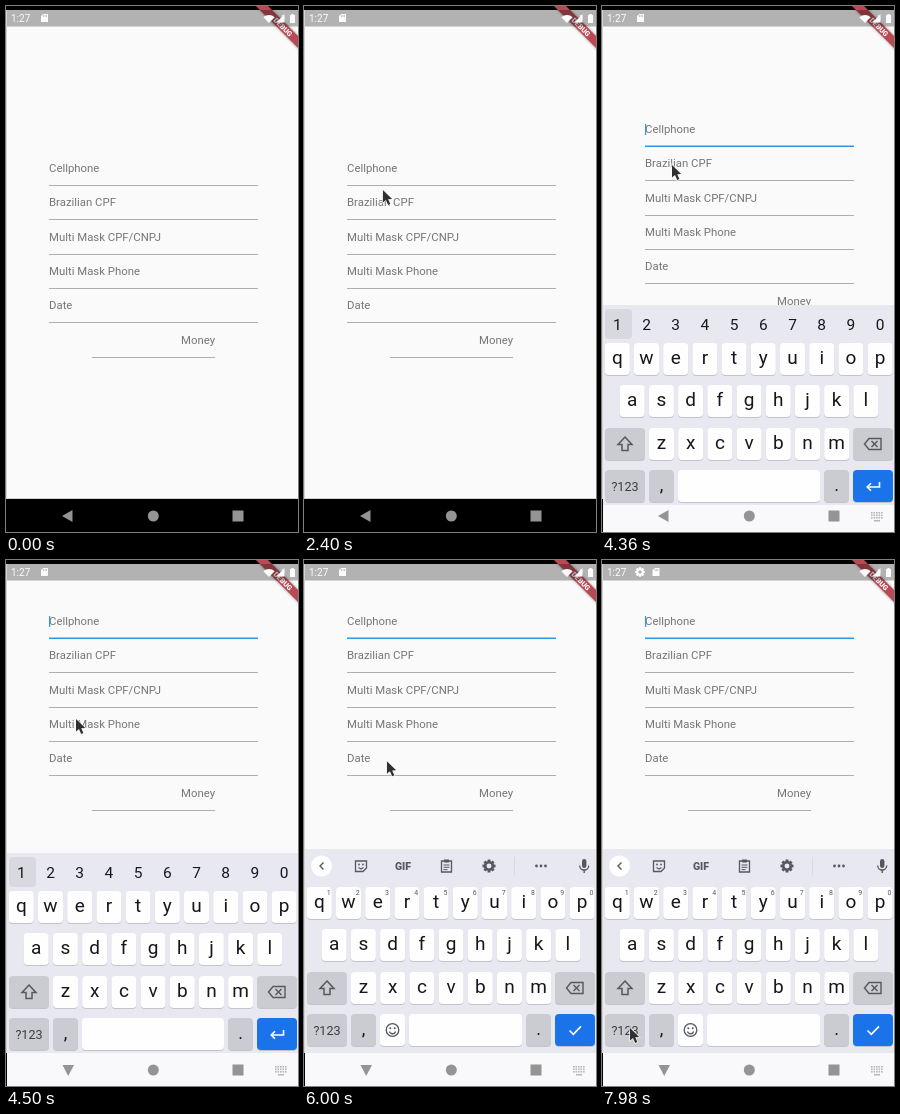
An HTML page with a canvas for the animation above (8000 ms loop, 292 by 526 pixels).

```html
<!DOCTYPE html>
<html lang="en">
<head>
<meta charset="utf-8">
<title>Masked form</title>
<style>
html, body { margin: 0; width: 100%; height: 100%; overflow: hidden; background: #000; }
canvas { display: block; }
</style>
</head>
<body>
<canvas id="stage" width="292" height="526"></canvas>
<script>
const W = 292, H = 526, LOOP = 8000;
const screen2d = document.getElementById('stage').getContext('2d');
const layer = document.createElement('canvas');
layer.width = W;
layer.height = H;
const layer2d = layer.getContext('2d');
let ctx = screen2d;

const FONT = 'Roboto, "Open Sans", sans-serif';
const PAGE = '#fafafb', BOARD = '#e8e9f0', KEY = '#fefefe', DARK_KEY = '#cbccd1';
const INK = '#161719', SOFT = '#55585c', LABEL = '#767676', BLUE = '#1a73e8';
const ACCENT = '#2f97e6', EDGE = '#d4d4cc', STATUS = '#fcfcfc', SHADE = '#b1b1b2';

// Times in ms
const FOCUS = 3540, SLIDE = 4040, DOCKED = 4400, LIFT = 4300, LIFTED = 4460;
const TOOLBAR = 4700, EXTRAS = 5240, GEAR = 6400;

// Pointer stops: time, x, y
const POINTER = [
  [1260, -9, 346], [1400, 22, 268], [1560, 74, 213], [1700, 112, 232], [1840, 132, 258],
  [2100, 132, 258], [2400, 79, 184], [2640, 58, 154], [2820, 47, 163],
  [2920, 47, 163], [3010, 58, 150], [3100, 70, 159],
  [5160, 70, 159], [5900, 83, 201], [6000, 83, 201], [6740, 55, 400],
  [6840, 55, 400], [7020, 49, 414], [7580, 28, 464], [7680, 28, 464], [7980, 28, 468]
];

const clamp = v => Math.max(0, Math.min(1, v));
const span = (t, a, b) => clamp((t - a) / (b - a));

function rect(x, y, w, h, color) {
  ctx.fillStyle = color;
  ctx.fillRect(x, y, w, h);
}

function round(x, y, w, h, r, color) {
  ctx.fillStyle = color;
  ctx.beginPath();
  ctx.roundRect(x, y, w, h, r);
  ctx.fill();
}

function disc(x, y, r, color) {
  ctx.fillStyle = color;
  ctx.beginPath();
  ctx.arc(x, y, r, 0, Math.PI * 2);
  ctx.fill();
}

function arc(x, y, r, from, to, color, width) {
  ctx.strokeStyle = color;
  ctx.lineWidth = width;
  ctx.beginPath();
  ctx.arc(x, y, r, from, to);
  ctx.stroke();
}

function trace(pts, close) {
  ctx.beginPath();
  pts.forEach(([x, y]) => ctx.lineTo(x, y));
  if (close) ctx.closePath();
}

function poly(pts, color) {
  trace(pts, true);
  ctx.fillStyle = color;
  ctx.fill();
}

function line(pts, color, width, close) {
  trace(pts, close);
  ctx.strokeStyle = color;
  ctx.lineWidth = width;
  ctx.stroke();
}

function text(s, x, y, size, color, align = 'center', weight = 400) {
  ctx.font = `${weight} ${size}px ${FONT}`;
  ctx.textAlign = align;
  ctx.fillStyle = color;
  ctx.fillText(s, x, y);
}

function gear(x, y, r, color, hole) {
  for (let i = 0; i < 8; i++) {
    ctx.save();
    ctx.translate(x, y);
    ctx.rotate(i * Math.PI / 4);
    rect(-r * 0.22, -r, r * 0.44, r, color);
    ctx.restore();
  }
  disc(x, y, r * 0.78, color);
  disc(x, y, r * 0.38, hole);
}

function form(t) {
  const top = -Math.round(101 * span(t, LIFT, LIFTED));
  const idle = '#aeaeae';
  const labels = ['Cellphone', 'Brazilian CPF', 'Multi Mask CPF/CNPJ', 'Multi Mask Phone', 'Date'];
  labels.forEach((s, i) => {
    text(s, 43, 166 + top + i * 34.35, 11.36, LABEL, 'left');
    rect(43, Math.round(179 + top + i * 34.35), 209, 1, idle);
  });
  text('Money', 209, 338 + top, 11.36, LABEL, 'right');
  rect(86, 351 + top, 123, 1, idle);
  if (t < FOCUS) return;
  ctx.globalAlpha = span(t, FOCUS, FOCUS + 200);
  rect(43, 178.5 + top, 209, 1.5, ACCENT);
  ctx.globalAlpha = 1;
  if (t < 5000 || t % 1000 >= 500) rect(43, 157 + top, 1.2, 11, ACCENT);
}

function banner() {
  ctx.save();
  ctx.translate(292, 4);
  ctx.rotate(Math.PI / 4);
  ctx.shadowColor = 'rgba(0,0,0,.4)';
  ctx.shadowBlur = 3;
  rect(-34, 18.4, 68, 8.5, '#b84a55');
  ctx.shadowBlur = 0;
  text('DEBUG', 1.5, 25.3, 7.2, '#fff', 'center', 900);
  ctx.restore();
}

function memoryCard(x) {
  poly([[x, 10], [x + 2.5, 8], [x + 7, 8], [x + 7, 16], [x, 16]], STATUS);
  for (let i = 0; i < 3; i++) rect(x + 2.2 + i * 1.5, 9, 0.7, 2, SHADE);
}

function statusBar(t) {
  rect(0, 4, W, 16.5, 'rgba(0,0,0,.29)');
  text('1:27', 5, 16, 10, STATUS, 'left');
  if (t >= GEAR) gear(38, 12, 4.8, STATUS, SHADE);
  memoryCard(t >= GEAR ? 50.5 : 35);
  ctx.fillStyle = STATUS;
  ctx.beginPath();
  ctx.moveTo(263, 17);
  ctx.arc(263, 17, 8, -Math.PI * 0.75, -Math.PI * 0.25);
  ctx.fill();
  poly([[270.5, 16.5], [278.5, 16.5], [278.5, 8]], STATUS);
  line([[276, 9], [278.5, 12]], STATUS, 0.8);
  rect(284, 9, 5, 8, STATUS);
  rect(285.3, 8, 2.4, 1, STATUS);
}

function keyCap(x, y, w, color) {
  round(x, y + 1, w, 32, 4, 'rgba(60,64,80,.22)');
  round(x, y, w, 32, 4, color);
}

function keyRow(letters, x, y, tags) {
  [...letters].forEach((ch, i) => {
    const cx = x + i * 29.2;
    keyCap(cx - 12.5, y, 25, KEY);
    text(ch, cx, y + 21, 19, INK);
    if (tags) text((i + 1) % 10, cx + 9.3, y + 8, 7, SOFT);
  });
}

function toolbar(t, y) {
  if (t >= EXTRAS) {
    disc(17.5, y, 10.5, KEY);
    line([[19.5, y - 3.5], [16, y], [19.5, y + 3.5]], SOFT, 1.4);
  }
  line([[51.5, y - 5], [62.5, y - 5], [62.5, y + 2], [59, y + 5.5], [51.5, y + 5.5]], SOFT, 1.3, true);
  disc(55, y - 1.5, 0.9, SOFT);
  disc(59, y - 1.5, 0.9, SOFT);
  line([[54.5, y + 1.5], [57, y + 3], [59.5, y + 1.5]], SOFT, 1.1);
  text('GIF', 99, y + 3.7, 10.5, SOFT, 'center', 900);
  line([[137.5, y - 5], [147.5, y - 5], [147.5, y + 6], [137.5, y + 6]], SOFT, 1.3, true);
  rect(140, y - 6.5, 5, 3, SOFT);
  for (let i = 0; i < 3; i++) rect(139.5, y - 1.5 + i * 2.3, i < 2 ? 6 : 4, 1, SOFT);
  gear(185, y, 6.5, SOFT, BOARD);
  rect(210, y - 9, 1, 18, '#d9dae0');
  for (let i = 0; i < 3; i++) disc(232.5 + i * 4.5, y, 1.4, SOFT);
  round(278, y - 7, 4.4, 9, 2.2, SOFT);
  arc(280.2, y - 0.5, 4.5, 0, Math.PI, SOFT, 1.3);
  rect(279.5, y + 4, 1.4, 3, SOFT);
}

function numberRow(y) {
  round(3, y - 15, 27, 30, 4, '#d8d9df');
  for (let i = 0; i < 10; i++) text((i + 1) % 10, 15.3 + i * 29.2, y + 5.5, 15.5, INK);
}

function bottomRow(t, y) {
  const extras = t >= EXTRAS;
  keyCap(3, y, 40, DARK_KEY);
  text('?123', 23, y + 20.5, 12.6, '#3a3c40');
  keyCap(47, y, 25, DARK_KEY);
  text(',', 59.5, y + 21, 18, INK);
  const space = extras ? 105 : 76;
  keyCap(space, y, 218 - space, KEY);
  if (extras) {
    keyCap(76, y, 25, KEY);
    arc(88.5, y + 16, 6.3, 0, Math.PI * 2, SOFT, 1.3);
    disc(86.3, y + 14.2, 1, SOFT);
    disc(90.7, y + 14.2, 1, SOFT);
    arc(88.5, y + 16.5, 3.2, 0.3, Math.PI - 0.3, SOFT, 1.3);
  }
  keyCap(222, y, 25, DARK_KEY);
  text('.', 234.5, y + 21, 18, INK);
  keyCap(251, y, 40, BLUE);
  if (extras) {
    line([[265.5, y + 16.5], [269.3, y + 20.3], [277, y + 12.3]], KEY, 1.7);
  } else {
    line([[277.5, y + 12], [277.5, y + 17], [265.5, y + 17]], KEY, 1.6);
    line([[269, y + 13.2], [265.2, y + 17], [269, y + 20.8]], KEY, 1.6);
  }
}

function keys(t, y, tools) {
  rect(1, y, W - 1, H, BOARD);
  rect(1, y + (tools ? 204 : 200), W - 1, H, '#f9f9fb');
  if (tools) toolbar(t, y + 17);
  else numberRow(y + 19);
  keyRow('qwertyuiop', 15.3, y + 38, tools);
  keyRow('asdfghjkl', 30.2, y + 80);
  const z = y + 123;
  keyRow('zxcvbnm', 59.5, z);
  keyCap(3, z, 40, DARK_KEY);
  line([[23, z + 9], [30, z + 16.5], [26, z + 16.5], [26, z + 22.5], [20, z + 22.5], [20, z + 16.5], [16, z + 16.5]],
    SOFT, 1.5, true);
  keyCap(251, z, 40, DARK_KEY);
  line([[262.5, z + 16], [267, z + 10.5], [279, z + 10.5], [279, z + 21.5], [267, z + 21.5]], SOFT, 1.4, true);
  line([[269.5, z + 13], [275.5, z + 19]], SOFT, 1.4);
  line([[275.5, z + 13], [269.5, z + 19]], SOFT, 1.4);
  bottomRow(t, y + 165);
}

// The keyboard fades in as one layer while it slides up.
function keyboard(t) {
  const p = span(t, SLIDE, DOCKED);
  if (!p) return;
  const tools = t >= TOOLBAR;
  const y = Math.round(293 + 204 * (1 - p) ** 1.6) - (tools ? 4 : 0);
  ctx = layer2d;
  ctx.clearRect(0, 0, W, H);
  keys(t, y, tools);
  ctx = screen2d;
  ctx.globalAlpha = Math.min(1, p * 1.4);
  ctx.drawImage(layer, 0, 0);
  ctx.globalAlpha = 1;
}

function navIcons(t) {
  const c = '#949494';
  if (t >= DOCKED) poly([[56.5, 505], [68, 505], [62.2, 516]], c);
  else poly([[66.5, 504], [66.5, 516], [56, 510]], c);
  disc(147.3, 510, 5.5, c);
  rect(226.5, 504.5, 11, 11, c);
  if (t < SLIDE) return;
  ctx.globalAlpha = 0.65;
  for (let r = 0; r < 3; r++)
    for (let i = 0; i < 5; i++) rect(269 + i * 2.5, 506 + r * 2.5, 1.6, 1.6, c);
  rect(272, 514, 6, 1.5, c);
  ctx.globalAlpha = 1;
}

function pointer(t) {
  if (t < POINTER[0][0]) return;
  let [, x, y] = POINTER[POINTER.length - 1];
  const i = POINTER.findIndex(k => k[0] > t);
  if (i > 0) {
    const [t0, x0, y0] = POINTER[i - 1], [t1, x1, y1] = POINTER[i];
    const p = span(t, t0, t1);
    x = x0 + (x1 - x0) * p;
    y = y0 + (y1 - y0) * p;
  }
  ctx.save();
  ctx.translate(x, y);
  const arrow = [[0, 0], [0, 12.5], [3, 10], [5.2, 15], [7.4, 14], [5.2, 9.3], [9.2, 9]];
  line(arrow, 'rgba(255,255,255,.7)', 1.6, true);
  poly(arrow, '#303030');
  ctx.restore();
}

function draw(t) {
  rect(0, 0, W, H, '#000');
  rect(0, 4, W, 489, PAGE);
  form(t);
  banner();
  statusBar(t);
  rect(0, 492, W, 1, EDGE);
  keyboard(t);
  rect(0, 4, 1, 489, EDGE);
  navIcons(t);
  pointer(t);
}

const start = performance.now();
function tick(now) {
  draw(Math.max(0, now - start) % LOOP);
  requestAnimationFrame(tick);
}
draw(0);
requestAnimationFrame(tick);
</script>
</body>
</html>
```
